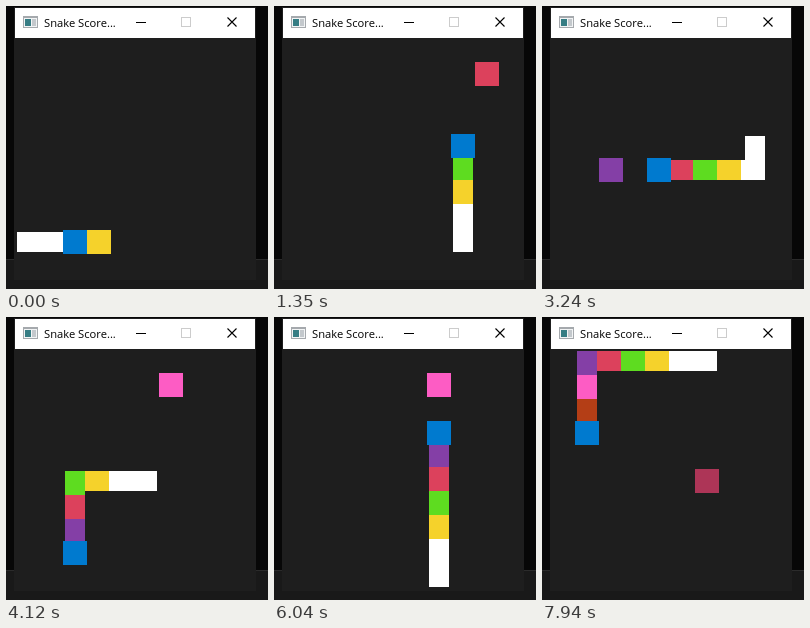
An HTML page that plays this animation: 262x283 px, repeating every 8 s.

```html
<!DOCTYPE html>
<html lang="en">
<head>
<meta charset="utf-8">
<title>Snake</title>
<style>
  html, body { margin: 0; width: 100%; height: 100%; overflow: hidden; background: #070707; }
  svg { display: block; }
  text { font: 11.2px "Open Sans", "Noto Sans", sans-serif; }
</style>
</head>
<body>
<svg width="262" height="283" viewBox="0 0 262 283">
  <g shape-rendering="crispEdges">
    <rect width="262" height="283" fill="#070707"/>
    <rect y="253" width="262" height="30" fill="#191919"/>
    <rect y="253" width="262" height="1" fill="#2b2b2b"/>
    <rect x="8" y="1" width="242" height="273" fill="#1e1e1e"/>
    <rect x="9" y="2" width="240" height="30" fill="#fff"/>
    <rect x="17" y="10" width="15" height="12" fill="#a5a9ad"/>
    <rect x="18" y="12" width="13" height="9" fill="#f2f4f5"/>
    <rect x="19" y="13" width="6" height="7" fill="#367d84"/>
    <rect x="26" y="13" width="4" height="7" fill="#c3c8cc"/>
    <rect x="130" y="16" width="10" height="1" fill="#000"/>
    <rect x="175.5" y="11.5" width="9" height="9" fill="none" stroke="#ccc"/>
  </g>
  <path d="M221.5 11.5l9 9m0-9l-9 9" stroke="#000" stroke-width="1.1"/>
  <text x="38" y="21">Snake Score...</text>
  <g id="board" shape-rendering="crispEdges"></g>
</svg>
<script>
const LOOP = 8000, CELL = 24, LEFT = 9, TOP = 32, INSET = 2;
const HEAD = '#007acf';
const DIRS = { R: [1, 0], L: [-1, 0], U: [0, -1], D: [0, 1] };
const TURNS = 'R5 U7 R1 D4 L6 D4 R4 U9 L5 D3';

// The move on which each food is eaten, and its colour
const FOODS = [
  [1, '#f5d22b'], [7, '#5edc20'], [13, '#dc415c'], [23, '#843fa6'],
  [39, '#fd5cc4'], [46, '#b43e16'], [Infinity, '#ad3557', [6, 5]]
];

// Runs of moves: first move, count, start and end time
const RUNS = [
  [1, 7, 130, 1040], [8, 5, 1200, 1800], [13, 7, 2080, 2940],
  [21, 2, 3240, 3370], [23, 1, 3530, 3530], [24, 4, 3810, 4270],
  [28, 3, 4570, 4850], [31, 8, 5160, 6190], [39, 5, 6470, 7050],
  [44, 2, 7200, 7360], [46, 3, 7660, 7940]
];

const path = [[0, 8], [1, 8], [2, 8]];
const START = path.length - 1;
for (const [dir, count] of TURNS.split(' ')) {
  for (let i = 0; i < +count; i++) {
    const [x, y] = path.at(-1), [dx, dy] = DIRS[dir];
    path.push([x + dx, y + dy]);
  }
}
const cellAt = move => path[START + move];

const ticks = RUNS.flatMap(([first, count, from, to]) =>
  Array.from({ length: count }, (_, i) => ({
    move: first + i,
    time: Math.floor((from + (to - from) * i / Math.max(1, count - 1)) / 10) * 10
  })));

const rect = (x, y, w, h, fill) =>
  `<rect x="${x}" y="${y}" width="${w}" height="${h}" fill="${fill}"/>`;

const block = ([x, y], fill) =>
  rect(LEFT + x * CELL, TOP + y * CELL, CELL, CELL, fill);

// An inset square that reaches over to the piece ahead of it
function link([x, y], [nx, ny], fill) {
  const gap = 2 * INSET, size = CELL - gap, dx = nx - x, dy = ny - y;
  return rect(
    LEFT + x * CELL + INSET + Math.min(0, dx) * gap,
    TOP + y * CELL + INSET + Math.min(0, dy) * gap,
    size + Math.abs(dx) * gap, size + Math.abs(dy) * gap, fill);
}

function render(move) {
  const [eatenOn, color, place] = FOODS.find(([m]) => m > move);
  const grown = FOODS.filter(([m]) => m < move).map(food => food[1]);
  const body = ['#fff', '#fff', ...grown].reverse();
  return block(place || cellAt(eatenOn), color) +
    body.map((fill, i) => link(cellAt(move - 1 - i), cellAt(move - i), fill)).join('') +
    block(cellAt(move), HEAD);
}

const board = document.getElementById('board');
const begin = performance.now();
let shown = -1;

function frame() {
  const t = (performance.now() - begin) % LOOP;
  const tick = ticks.findLast(({ time }) => time <= t);
  const move = tick ? tick.move : 0;
  if (move !== shown) {
    board.innerHTML = render(move);
    shown = move;
  }
  requestAnimationFrame(frame);
}
frame();
</script>
</body>
</html>
```
